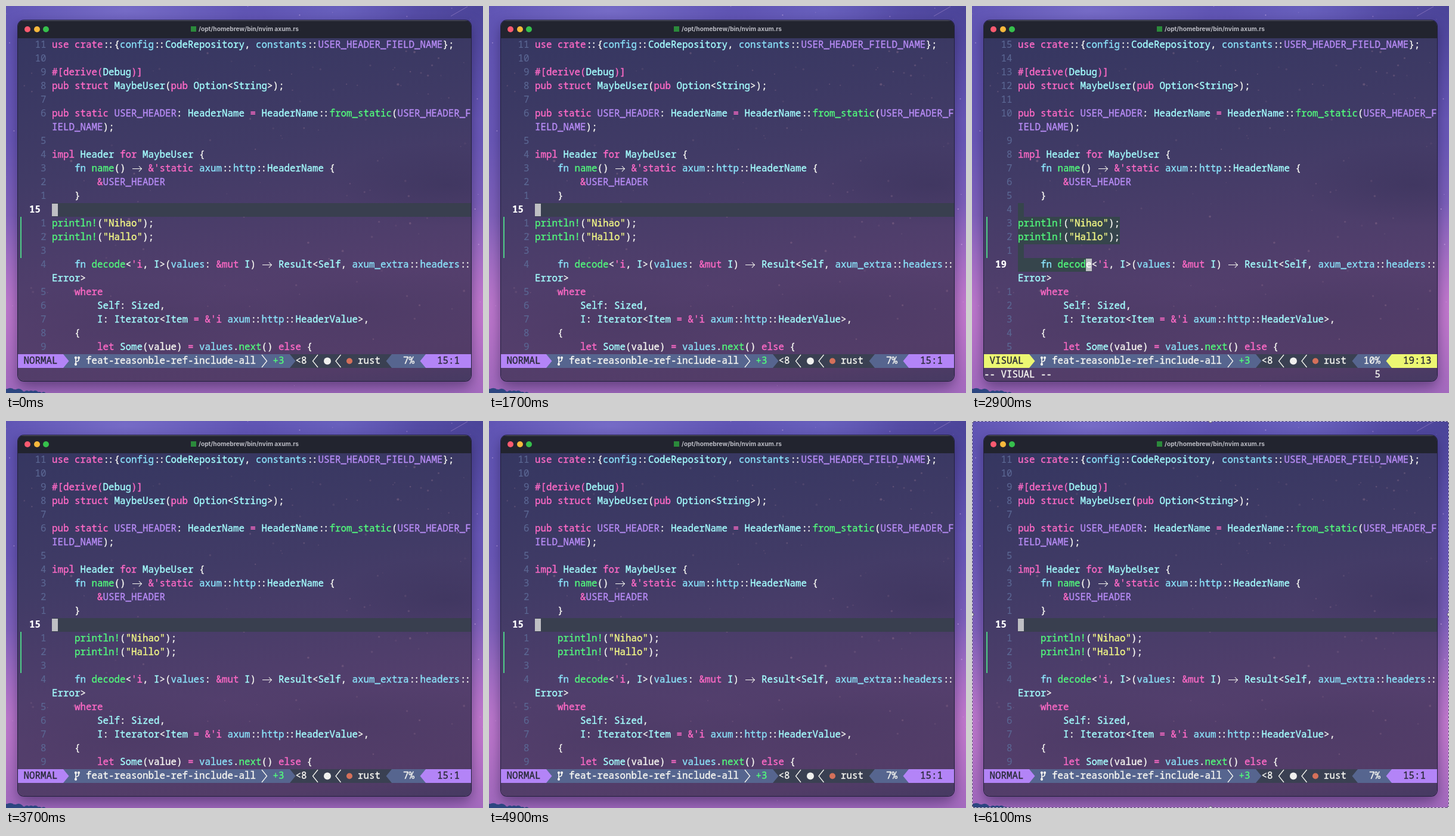
Write an HTML page with a canvas that moves like this. It is 800 px wide and 648 px high and loops after 6200 ms.

```html
<!DOCTYPE html>
<html lang="en">
<head>
<meta charset="utf-8">
<title>Editor</title>
<style>
  :root { --fg: #f8f8f2; --pink: #ff6ac6; --mode: #b384f7; }
  html, body { margin: 0; width: 100%; height: 100%; overflow: hidden; }
  #stage {
    position: relative; width: 800px; height: 648px; overflow: hidden;
    background:
      radial-gradient(ellipse 200px 50px at 200px 8px, #8a80d888, transparent),
      radial-gradient(ellipse 130px 40px at 560px 6px, #6f6ac588, transparent),
      radial-gradient(ellipse 110px 150px at 0 500px, #d584d888, transparent),
      radial-gradient(ellipse 110px 170px at 800px 500px, #d983d899, transparent),
      radial-gradient(ellipse 240px 190px at 800px 0, #38358088, transparent),
      linear-gradient(#6055b4, #6a58b8 35%, #8a66be 62%, #a86cc2 82%, #a069bd);
  }
  #win {
    position: absolute; left: 20px; top: 24px; width: 760px; height: 604px;
    border-radius: 10px;
    background:
      radial-gradient(ellipse 190px 70px at 720px 275px, #2f2c5255, transparent),
      radial-gradient(ellipse 260px 70px at 190px 500px, #3f345a55, transparent),
      radial-gradient(ellipse 260px 70px at 560px 480px, #3f345a44, transparent),
      linear-gradient(172deg, #343660, #413b66 38%, #543f6d 72%, #523c67 93%, #463a62);
    box-shadow: 0 0 0 1px #22203c, 0 9px 22px #1b143b80;
  }
  #sky, #ants { position: absolute; left: 0; top: 0; }
  #ui { position: absolute; left: 20px; top: 24px; width: 760px; height: 604px; border-radius: 10px; overflow: hidden; }
  #bar { height: 30px; background: #22242f; box-shadow: inset 0 1px #555765; }
  #bar i { position: absolute; top: 10px; width: 10px; height: 10px; border-radius: 50%; }
  #bar b { position: absolute; left: 290px; top: 10px; width: 9px; height: 9px; background: #2b8a3b; }
  #bar span {
    position: absolute; left: 303px; top: 0; white-space: pre;
    font: 700 10.2px/29px Inter, sans-serif; color: #b9bac2;
  }
  #grid {
    position: absolute; left: 0; top: 30px; width: 760px; height: 574px; color: var(--fg);
    font: 500 15.833px/23px "Noto Sans Mono", monospace; font-variant-ligatures: none;
    -webkit-text-stroke: .35px;
  }
  #grid > div { position: absolute; white-space: pre; height: 23px; }
  #grid .text { margin-top: -1px; }
  #grid .num { color: #5b6793; -webkit-text-stroke: .15px; }
  #grid .now { color: #fff; font-weight: 700; }
  #grid .sel { background: #36454c; }
  #grid .line { background: #393f4f; }
  #grid .cursor { background: #bfbfc4; color: #fff; margin-top: 1px; height: 21px; line-height: 19px; }
  #grid .sign { background: #4fce88; width: 2.4px; }
  #status { position: absolute; left: 0; top: 529px; }
  .k { color: var(--pink); }
  .g { color: #52fa7c; }
  .c { color: #8be4fb; }
  .t { color: #a4ffff; }
  .n { color: #b78bf5; }
  .y { color: #f4fa86; }
  .ink { color: #282a36; }
  .sep { letter-spacing: -2px; padding: 0 3px 0 1px; }
  .arrow { display: inline-block; position: relative; width: 19px; height: 23px; vertical-align: top; color: transparent; -webkit-text-stroke: 0; }
  .arrow::before { content: ""; position: absolute; left: 2px; top: 11.5px; width: 15px; height: 1.8px; background: var(--fg); }
  .arrow::after {
    content: ""; position: absolute; left: 10px; top: 9px; width: 5.5px; height: 5.5px;
    border: solid var(--fg); border-width: 1.8px 1.8px 0 0; transform: rotate(45deg);
  }
</style>
</head>
<body>
<div id="stage">
  <div id="win"></div>
  <canvas id="sky" width="800" height="648"></canvas>
  <div id="ui">
    <div id="bar">
      <i style="left:11px;background:#fb5a70"></i>
      <i style="left:26.5px;background:#f6b83c"></i>
      <i style="left:42px;background:#36c04c"></i>
      <b></b><span>/opt/homebrew/bin/nvim axum.rs</span>
    </div>
    <div id="grid">
      <svg id="status" width="760" height="23">
        <path d="M0 0H760V23H0z" fill="#56658f"/>
        <path d="M456 0H627L617.5 11.5L627 23H456L465.5 11.5z" fill="#3a4052"/>
        <path d="M0 0H76L85.5 11.5L76 23H0zM760 0H684L674.5 11.5L684 23H760z" fill="var(--mode)"/>
        <path d="M409 1L417.5 11.5L409 22M503 1L494.5 11.5L503 22M541.5 1L533 11.5L541.5 22" fill="none" stroke="#f8f8f2" stroke-width="1.3"/>
        <g fill="none" stroke="#f8f8f2" stroke-width="1.7">
          <path d="M97 6V17M102 7V9Q102 12 97 13"/>
          <circle cx="97" cy="6" r="1.3"/><circle cx="102" cy="6" r="1.3"/><circle cx="97" cy="17" r="1.3"/>
        </g>
        <circle cx="519" cy="11.5" r="6" fill="#f0f0ee"/>
        <circle cx="556" cy="11.5" r="5" fill="#d5705a"/>
      </svg>
    </div>
  </div>
  <svg id="ants" width="800" height="648" fill="none" visibility="hidden">
    <path d="M.5 .5H799.5V647.5H.5z" stroke="#55506a"/>
    <path d="M.5 .5H799.5V647.5H.5z" stroke="#e8e6f0" stroke-dasharray="3 3"/>
    <g id="knobs" fill="#d9d7e2" stroke="#55506a"></g>
  </svg>
</div>
<script>
const LOOP = 6200, COL = 9.5, ROW = 23, GUTTER = 6, TOTAL = 189;
const $ = id => document.getElementById(id);
const grid = $('grid');

// A leading "|" marks the wrapped rest of the line above.
const code = `use crate::{config::CodeRepository, constants::USER_HEADER_FIELD_NAME};

#[derive(Debug)]
pub struct MaybeUser(pub Option<String>);

pub static USER_HEADER: HeaderName = HeaderName::from_static(USER_HEADER_F
|IELD_NAME);

impl Header for MaybeUser {
    fn name() -> &'static axum::http::HeaderName {
        &USER_HEADER
    }

println!("Nihao");
println!("Hallo");

    fn decode<'i, I>(values: &mut I) -> Result<Self, axum_extra::headers::
|Error>
    where
        Self: Sized,
        I: Iterator<Item = &'i axum::http::HeaderValue>,
    {
        let Some(value) = values.next() else {`.split('\n');

const rules = {
  y: /"[^"]*"/,
  arrow: /->/,
  sep: /::/,
  k: /#\[\w+\(|\)\]|&'\w+|&mut|&|'\w+|=|\b(?:use|crate|pub|struct|static|impl|for|where|let|else)\b/,
  g: /println!|\b(?:name|from_static|decode|next)\b/,
  c: /\b(?:fn|config|constants|axum|axum_extra|http|headers|values)\b/,
  n: /\b[A-Z]+_[A-Z_]+\b/,
  t: /\b[A-Z]\w*/
};
const lexer = new RegExp(Object.entries(rules).map(([k, r]) => `(?<${k}>${r.source})`).join('|'), 'g');

function highlight(el, text) {
  el.textContent = '';
  let end = 0;
  for (const m of text.matchAll(lexer)) {
    el.append(text.slice(end, m.index));
    const part = document.createElement('span');
    part.className = Object.keys(rules).find(k => m.groups[k]);
    part.textContent = m[0];
    el.append(part);
    end = m.index + m[0].length;
  }
  el.append(text.slice(end));
}

function put(cls, col, row, text = '') {
  const el = document.createElement('div');
  el.className = cls;
  el.style.left = col * COL + 'px';
  el.style.top = row * ROW + 'px';
  el.textContent = text;
  grid.append(el);
  return el;
}

function span(el, col, row, cells) {
  Object.assign(el.style, { left: col * COL + 'px', top: row * ROW + 'px', width: cells * COL + 'px' });
}

let lineNo = 3;
const rows = code.map((src, row) => {
  const wrapped = src[0] === '|';
  return { row, src: wrapped ? src.slice(1) : src, no: wrapped ? 0 : ++lineNo };
});
const rowOf = no => rows.find(r => r.no === no);

const current = put('line', GUTTER, 0);
rows.forEach(r => r.sel = put('sel', GUTTER, r.row));
rows.forEach(r => {
  r.num = put('text num', 2, r.row);
  r.el = put('text', GUTTER, r.row);
  highlight(r.el, r.src);
});
const sign = put('sign', .4, 13);
sign.style.height = 3 * ROW + 'px';
const cursor = put('cursor', GUTTER, 12);

put('text', 12, 23, 'feat-reasonble-ref-include-all');
put('text g', 45, 23, '+3');
put('text', 49, 23, '<8');
put('text', 60, 23, 'rust');
const mode = put('text ink', 1, 23);
const percent = put('text', 67, 23);
const ruler = put('text ink', 74, 23);
const message = put('text', 0, 24);
const pending = put('text', 69, 24);

// time, line, column, visual mode, indented
const steps = [
  [0, 15, 1, 0, 0],
  [2000, 15, 1, 1, 0],
  [2200, 16, 1, 1, 0],
  [2300, 17, 1, 1, 0],
  [2400, 18, 1, 1, 0],
  [2500, 19, 1, 1, 0],
  [2600, 19, 6, 1, 0],
  [2800, 19, 13, 1, 0],
  [3300, 15, 1, 0, 1]
];

function show([, line, col, visual, indented]) {
  for (const r of rows) {
    const isNow = r.no === line;
    r.num.className = 'text num' + (isNow ? ' now' : '');
    r.num.textContent = !r.no ? '' : isNow ? line : String(Math.abs(r.no - line)).padStart(3);
    if (r.src.startsWith('println')) highlight(r.el, (indented ? '    ' : '') + r.src);
    const picked = visual && r.no >= 15 && r.no <= line;
    span(r.sel, GUTTER, r.row, !picked ? 0 : isNow ? col : Math.max(1, r.src.length));
  }
  const at = rowOf(line);
  span(current, GUTTER, at.row, visual ? 0 : 74);
  span(cursor, GUTTER + col - 1, at.row, 1);
  cursor.textContent = at.src[col - 1] || '';
  mode.textContent = visual ? 'VISUAL' : 'NORMAL';
  percent.textContent = (Math.floor(100 * line / TOTAL) + '%').padStart(3);
  ruler.textContent = line + ':' + col;
  message.textContent = visual ? '-- VISUAL --' : '';
  pending.textContent = visual ? line - 14 : '';
  $('stage').style.setProperty('--mode', visual ? '#ecf772' : '#b384f7');
}

function paintSky() {
  const g = $('sky').getContext('2d');
  let seed = 11;
  const rnd = () => (seed = seed * 16807 % 2147483647) / 2147483647;
  const dot = (x, y, r, color) => {
    g.fillStyle = color;
    g.beginPath();
    g.arc(x, y, r, 0, 7);
    g.fill();
  };
  for (let i = 0; i < 170; i++) {
    const x = rnd() * 800, y = rnd() * 640, a = .12 + rnd() * .35, r = .5 + rnd() * .6;
    if (x < 19 || x > 781 || y < 23 || y > 630) dot(x, y, r, `rgba(240,205,245,${a})`);
  }
  // Stars in the window thin out towards its left and lower edge.
  for (let i = 0; i < 120; i++) {
    const x = 770 - 740 * rnd() ** 1.3, y = 60 + 500 * rnd() ** 1.3;
    dot(x, y, .8 + rnd() * 1.3, `rgba(190,145,165,${.08 + rnd() * .2})`);
  }
  g.strokeStyle = '#e2b9ee55';
  g.beginPath();
  g.moveTo(746, 17);
  g.lineTo(774, 1);
  g.stroke();
  for (let x = 0; x < 66; x += 7) dot(x, 651 - 2 * rnd(), 8 - x / 11 + 3 * rnd(), '#2c4680');
}

for (const [x, y] of [[0, 0], [400, 0], [800, 0], [0, 324], [800, 324], [0, 648], [400, 648], [800, 648]]) {
  const knob = document.createElementNS('http://www.w3.org/2000/svg', 'circle');
  knob.setAttribute('cx', x);
  knob.setAttribute('cy', y);
  knob.setAttribute('r', 3);
  $('knobs').append(knob);
}

let shown;
function tick() {
  const t = performance.now() % LOOP;
  const step = steps.findLast(s => s[0] <= t);
  if (step !== shown) show(shown = step);
  $('ants').setAttribute('visibility', t >= 6100 ? 'visible' : 'hidden');
  requestAnimationFrame(tick);
}

paintSky();
tick();
</script>
</body>
</html>
```
